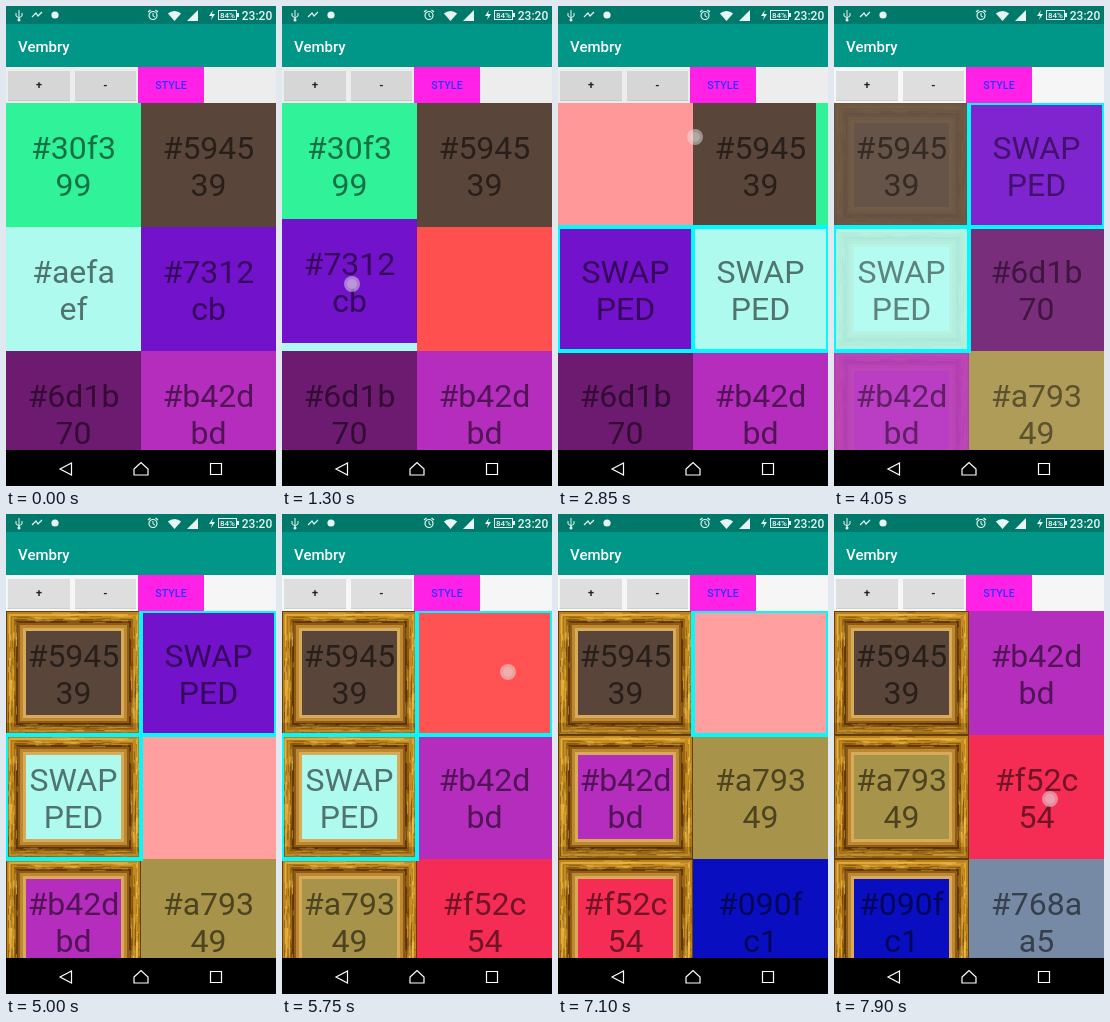
These frames come from a looping animation (270 px wide and 480 px high, 8000 ms). An HTML page with a canvas:

```html
<!DOCTYPE html>
<html lang="en">
<head>
<meta charset="utf-8">
<title>Color grid</title>
<style>
html, body { margin: 0; width: 100%; height: 100%; overflow: hidden; background: #000; }
canvas { display: block; width: 270px; height: 480px; }
</style>
</head>
<body>
<canvas id="stage" width="270" height="480"></canvas>
<script>
const ctx = document.getElementById('stage').getContext('2d');
const LOOP = 8000, STEP = 50;
const CELL_W = 135, CELL_H = 124, TOP = 97, BOTTOM = 444;
const FONT = 'Roboto, sans-serif';
const COLORS = ['30f399', '594539', 'aefaef', '7312cb', '6d1b70',
  'b42dbd', 'a79349', 'f52c54', '090fc1', '768aa5', '3d8f62'];

const SWAP = { press: 200, drag: 700, arrive: 1300, move: 1350, drop: 1600, label: 1800 };
const STYLE = { press: 3900, fade: 4000 };
const SWIPES = [
  { at: 2650, index: 0, from: [40, 138], to: [137, 131] },
  { at: 4700, index: 3, from: [150, 286], to: [226, 283] },
  { at: 5650, index: 1, from: [150, 161], to: [226, 158] },
  { at: 6800, index: 1, from: [150, 161], to: [226, 158] }
];
const SWIPE_PATH = [[0, 0], [50, 52], [100, 140], [200, 258], [300, 268], [350, 270]];
const REMOVE_AFTER = 340, SHIFT_AFTER = 420, SHIFT_TIME = 260;

const clamp = v => Math.max(0, Math.min(1, v));
const mix = (a, b, p) => a + (b - a) * p;
const ease = v => 0.5 - Math.cos(Math.PI * clamp(v)) / 2;
const slot = i => [(i % 2) * CELL_W, TOP + Math.floor(i / 2) * CELL_H];
const between = (a, b, p) => [mix(a[0], b[0], p), mix(a[1], b[1], p)];

function follow(points, t) {
  for (let i = 1; i < points.length; i++) {
    const [t0, v0] = points[i - 1], [t1, v1] = points[i];
    if (t <= t1) return mix(v0, v1, clamp((t - t0) / (t1 - t0)));
  }
  return points[points.length - 1][1];
}

function rect(color, x, y, w, h) {
  ctx.fillStyle = color;
  ctx.fillRect(x, y, w, h);
}

function text(str, x, y, size, color, weight = 400, align = 'center') {
  ctx.font = `${weight} ${size}px ${FONT}`;
  ctx.textAlign = align;
  ctx.fillStyle = color;
  ctx.fillText(str, x, y);
}

function path(points, close) {
  ctx.beginPath();
  points.forEach(([x, y]) => ctx.lineTo(x, y));
  if (close) ctx.closePath();
}

function line(points, color, width, close) {
  path(points, close);
  ctx.strokeStyle = color;
  ctx.lineWidth = width;
  ctx.stroke();
}

function circle(x, y, r, color) {
  ctx.beginPath();
  ctx.arc(x, y, r, 0, Math.PI * 2);
  ctx.fillStyle = color;
  ctx.fill();
}

function drawCell(color, [x, y], alpha = 1, swapped = false) {
  const lines = swapped ? ['SWAP', 'PED'] : ['#' + color.slice(0, 4), color.slice(4)];
  ctx.globalAlpha = alpha;
  rect('#' + color, x, y, CELL_W, CELL_H);
  ctx.globalAlpha = 1;
  lines.forEach((s, i) =>
    text(s, x + 67.5, y + 56 + i * 37.3, 32, `rgba(0,0,0,${0.54 * alpha})`));
}

function crossfade(color, pos, p, before, after) {
  drawCell(color, pos, 1 - p, before);
  drawCell(color, pos, p, after);
}

function drawBorder([x, y], alpha) {
  ctx.globalAlpha = alpha;
  ctx.strokeStyle = '#00fbff';
  ctx.lineWidth = 4;
  ctx.strokeRect(x, y, CELL_W, CELL_H);
  ctx.globalAlpha = 1;
}

// Picture frame: nested bevel rings with seeded grain.
const frame = (() => {
  const c = document.createElement('canvas');
  c.width = CELL_W;
  c.height = CELL_H;
  const g = c.getContext('2d');
  const rings = [[0, '#68400a'], [1, '#bd811b'], [3, '#dfaa35'], [5, '#c48a20'],
    [8, '#9c6510'], [10, '#633807'], [12, '#8e5a14'], [14, '#bd8830'], [17, '#d7ab58']];
  for (const [d, color] of rings) {
    g.fillStyle = color;
    g.fillRect(d, d, CELL_W - 2 * d, CELL_H - 2 * d);
  }
  let seed = 11;
  const rnd = () => (seed = seed * 16807 % 2147483647) / 2147483647;
  for (let i = 0; i < 170; i++) {
    const wide = rnd() < 0.5, far = rnd() < 0.5;
    const d = 1 + rnd() * 10, len = 5 + rnd() * 16;
    const along = d + rnd() * ((wide ? CELL_W : CELL_H) - 2 * d - len);
    const across = far ? (wide ? CELL_H : CELL_W) - d - 1 : d;
    g.fillStyle = rnd() < 0.5 ? 'rgba(255,214,100,.4)' : 'rgba(75,38,0,.35)';
    if (wide) g.fillRect(along, across, len, 1);
    else g.fillRect(across, along, 1, len);
  }
  g.fillStyle = 'rgba(60,30,0,.22)';
  g.fillRect(0, CELL_H - 12, CELL_W, 12);
  g.clearRect(20, 20, CELL_W - 40, CELL_H - 40);
  return c;
})();

function drawFrames(alpha) {
  ctx.globalAlpha = alpha;
  for (let i = 0; i < 6; i += 2) ctx.drawImage(frame, ...slot(i));
  ctx.globalAlpha = 1;
}

function drawRed(pos, dx) {
  rect(`rgba(255,0,0,${1 - Math.abs(dx) / 430})`, ...pos, CELL_W, CELL_H);
}

function drawSwap(items, t) {
  const left = slot(2), right = slot(3);
  items.forEach((c, i) => { if (i !== 2 && i !== 3) drawCell(c, slot(i)); });
  if (t >= SWAP.label) {
    const p = ease((t - SWAP.label) / 250);
    crossfade('aefaef', right, p, false, true);
    crossfade('7312cb', left, p, false, true);
    return;
  }
  const p = ease((t - SWAP.drag) / (SWAP.arrive - SWAP.drag));
  const settle = ease((t - SWAP.drop) / 200);
  const dx = -CELL_W * p, dy = -8 * p * (1 - settle);
  if (t < SWAP.move && t >= SWAP.drag) drawRed(right, dx);
  drawCell('aefaef', between(left, right, ease((t - SWAP.move) / 250)));
  drawCell('7312cb', [right[0] + dx, right[1] + dy]);
}

function drawGrid(t) {
  const items = COLORS.slice();
  if (t >= SWAP.label) [items[2], items[3]] = [items[3], items[2]];
  let active = null, shift = 1, shiftFrom = 0;
  for (const s of SWIPES) {
    if (t < s.at) break;
    const age = t - s.at;
    if (age < REMOVE_AFTER) {
      active = s;
    } else {
      items.splice(s.index, 1);
      shift = ease((age - SHIFT_AFTER) / SHIFT_TIME);
      shiftFrom = s.index;
    }
  }

  const restyle = ease((t - STYLE.fade) / 250);
  if (t < SWAP.label + 250) {
    drawSwap(items, t);
  } else {
    const swapped = c => c === '7312cb' || c === 'aefaef';
    items.slice(0, 8).forEach((c, i) => {
      if (active && i === active.index) return;
      const pos = i >= shiftFrom ? between(slot(i + 1), slot(i), shift) : slot(i);
      if (restyle > 0 && restyle < 1) crossfade(c, pos, restyle, swapped(c), swapped(c));
      else drawCell(c, pos, 1, swapped(c));
    });
    if (active) {
      const pos = slot(active.index), c = items[active.index];
      const dx = follow(SWIPE_PATH, t - active.at);
      drawRed(pos, dx);
      drawCell(c, [pos[0] + dx, pos[1]], 1, swapped(c));
    }
  }

  if (restyle > 0) drawFrames(restyle);
  const border = ease((t - SWAP.label) / 250);
  if (border > 0) {
    items.forEach((c, i) => {
      if (c === '7312cb' || c === 'aefaef') drawBorder(slot(i), border);
    });
  }
}

function drawStatusBar() {
  const w = '#e8f5f3';
  rect('#00796b', 0, 0, 270, 18);
  line([[13, 4], [13, 14]], w, 1);
  line([[10, 7], [10, 10], [13, 12], [16, 10], [16, 7]], w, 1);
  circle(13, 14, 1.5, w);
  line([[26, 11], [30, 7], [32, 10], [36, 6]], w, 1.2);
  circle(49, 9, 3.6, w);

  ctx.beginPath();
  ctx.arc(147, 9.5, 4, 0, Math.PI * 2);
  ctx.strokeStyle = w;
  ctx.lineWidth = 1.2;
  ctx.stroke();
  line([[147, 7], [147, 10], [149, 11]], w, 1);
  line([[142, 6], [144.5, 4]], w, 1.2);
  line([[149.5, 4], [152, 6]], w, 1.2);

  ctx.fillStyle = w;
  ctx.beginPath();
  ctx.moveTo(168.5, 15);
  ctx.arc(168.5, 15, 10, -Math.PI * 0.73, -Math.PI * 0.27);
  ctx.fill();
  path([[181, 15], [192, 15], [192, 4]], true);
  ctx.fill();
  path([[207, 4], [203, 10], [206, 10], [205, 14], [209, 8], [206, 8]], true);
  ctx.fill();
  ctx.strokeStyle = w;
  ctx.lineWidth = 1;
  ctx.strokeRect(212.5, 4.5, 18, 9);
  rect(w, 231, 7, 2, 4);
  text('84%', 221.5, 12, 8, w, 500);
  text('23:20', 251, 14, 12, w, 500);
}

function drawButton(label, x, w, face) {
  rect('rgba(0,0,0,.16)', x, 66, w, 29);
  rect(face, x, 65, w, 29);
  text(label, x + w / 2, 83, 11, '#222', 700);
}

function drawHeader(t) {
  const late = t >= STYLE.press;
  drawStatusBar();
  rect('#009688', 0, 18, 270, 43);
  text('Vembry', 12, 46, 15, '#fff', 500, 'left');
  rect(late ? '#f6f6f6' : '#ededed', 0, 61, 270, 36);
  const face = late ? '#dedede' : '#d6d6d6';
  drawButton('+', 2, 62, face);
  drawButton('-', 69, 61, face);
  rect('#ff22e6', 132, 61, 66, 36);
  text('STYLE', 165, 83, 10.7, '#2b35ff', 500);
}

function drawNavBar() {
  rect('#000', 0, BOTTOM, 270, 36);
  line([[54, 463], [65.5, 457], [65.5, 469]], '#fff', 1.2, true);
  line([[128, 463], [135, 456.5], [142, 463], [142, 469], [128, 469]], '#fff', 1.2, true);
  line([[204.5, 457.5], [215.5, 457.5], [215.5, 468.5], [204.5, 468.5]], '#fff', 1.2, true);
}

function touchPoint(t) {
  if (t >= SWAP.press && t < SWAP.drop) {
    const p = ease((t - SWAP.drag) / (SWAP.arrive - SWAP.drag));
    return between([205, 286], [70, 278], p);
  }
  if (t >= STYLE.press && t < STYLE.fade) return [165, 80];
  if (t >= 7900) return [216, 285];
  const s = SWIPES.find(s => t >= s.at && t <= s.at + 200);
  return s && between(s.from, s.to, clamp((t - s.at) / 100));
}

function drawTouch(t) {
  const p = touchPoint(t);
  if (!p) return;
  circle(...p, 8, 'rgba(225,225,225,.5)');
  circle(...p, 5, 'rgba(235,235,235,.25)');
}

function render(t) {
  rect('#fff', 0, 0, 270, 480);
  ctx.save();
  ctx.beginPath();
  ctx.rect(0, TOP, 270, BOTTOM - TOP);
  ctx.clip();
  drawGrid(t);
  ctx.restore();
  drawHeader(t);
  drawNavBar();
  drawTouch(t);
}

function tick() {
  const t = performance.now() % LOOP;
  render(Math.floor(t / STEP) * STEP);
  requestAnimationFrame(tick);
}
tick();
</script>
</body>
</html>
```
